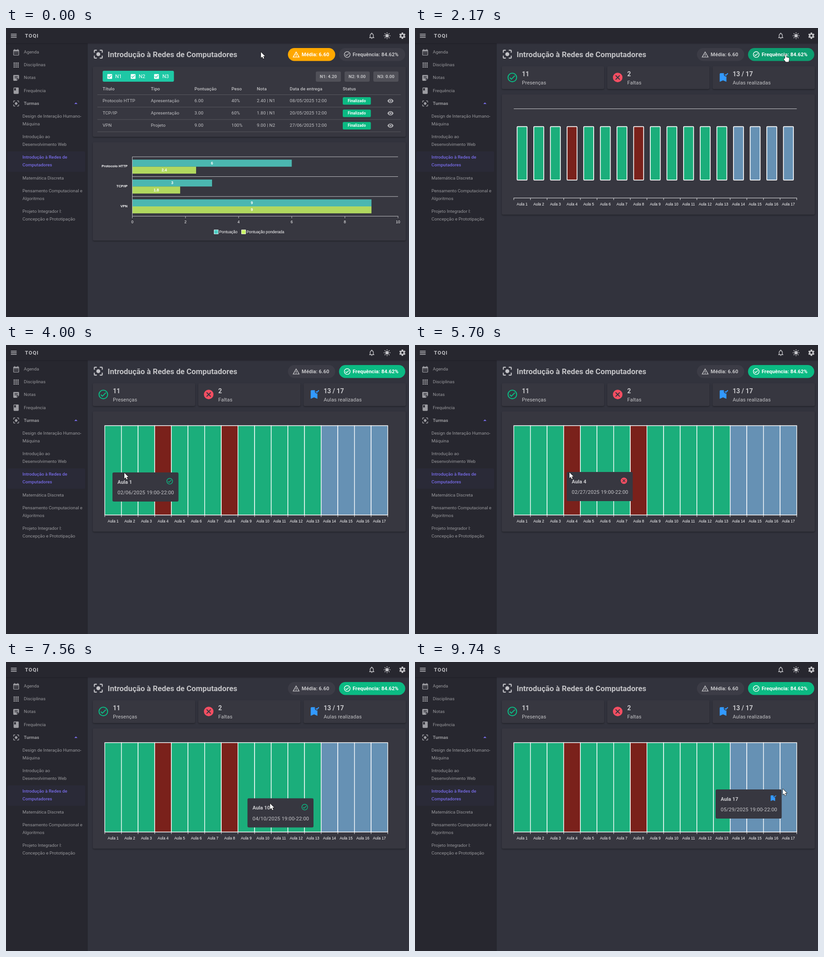
Recreate the animation shown at these times as an HTML page with a canvas. Size 882x635 px, loop 9.78 s.

```html
<!DOCTYPE html>
<html lang="pt">
<head>
<meta charset="utf-8">
<style>
  html, body { margin: 0; width: 100%; height: 100%; overflow: hidden; background: #32333d; }
  canvas { display: block; }
</style>
</head>
<body>
<canvas id="stage" width="882" height="635"></canvas>
<script>
const ctx = document.getElementById('stage').getContext('2d');
const LOOP = 9780, CLICK = 1730;
const SURFACE = '#373740', DARK = '#27272f', PRIMARY = '#776be7', SUCCESS = '#0bba83';
const WARNING = '#ffa800', ERROR = '#f64e62', INFO = '#3299ff';
const TEXT = 'rgba(255,255,255,.7)', MUTED = 'rgba(255,255,255,.52)', LINE = 'rgba(255,255,255,.16)';
const COURSE = 'Introdução à Redes de Computadores';

// Icons live on a 24 x 24 grid and are filled even-odd.
const DISC = 'M12 2a10 10 0 1 0 0 20 10 10 0 0 0 0-20z';
const squares = [4, 10, 16].flatMap(x => [4, 10, 16].map(y => `M${x} ${y}h4v4h-4z`)).join('');
const ICONS = {
  menu: 'M3 6h18v2H3zM3 11h18v2H3zM3 16h18v2H3z',
  bell: 'M10 20h4a2 2 0 0 1-4 0zM18 16v-5c0-3.1-1.6-5.6-4.5-6.3V4a1.5 1.5 0 0 0-3 0v.7C7.6 5.4 6 7.9 6 11v5l-2 2v1h16v-1zM16 17H8v-6c0-2.5 1.5-4.5 4-4.5s4 2 4 4.5z',
  calendar: 'M19 4h-1V2h-2v2H8V2H6v2H5a2 2 0 0 0-2 2v14a2 2 0 0 0 2 2h14a2 2 0 0 0 2-2V6a2 2 0 0 0-2-2zM5 9h14v11H5zM7 11h2v2H7zM11 11h2v2h-2zM15 11h2v2h-2zM7 15h2v2H7zM11 15h2v2h-2zM15 15h2v2h-2z',
  apps: squares,
  note: 'M5 3h14a2 2 0 0 1 2 2v9l-7 7H5a2 2 0 0 1-2-2V5a2 2 0 0 1 2-2zM7 7h10v2H7zM7 11h10v2H7zM14 19.5l5.5-5.5H14z',
  book: 'M18 2H6a2 2 0 0 0-2 2v16a2 2 0 0 0 2 2h12a2 2 0 0 0 2-2V4a2 2 0 0 0-2-2zM6 4h5v8l-2.5-1.5L6 12z',
  focus: 'M12 8a4 4 0 1 0 0 8 4 4 0 0 0 0-8zM5 15H3v4a2 2 0 0 0 2 2h4v-2H5zM5 5h4V3H5a2 2 0 0 0-2 2v4h2zM19 3h-4v2h4v4h2V5a2 2 0 0 0-2-2zM19 19h-4v2h4a2 2 0 0 0 2-2v-4h-2z',
  up: 'M7 14l5-5 5 5z',
  warning: 'M12 2L1 21h22zM12 6l7.5 13h-15zM11 16h2v2h-2zM11 10h2v5h-2z',
  check: DISC + 'M12 4a8 8 0 1 1 0 16 8 8 0 0 1 0-16zM16.6 7.6L10 14.2l-2.6-2.6L6 13l4 4 8-8z',
  cross: DISC + 'M17 15.6L15.6 17 12 13.4 8.4 17 7 15.6l3.6-3.6L7 8.4 8.4 7l3.6 3.6L15.6 7 17 8.4 13.4 12z',
  bookmark: 'M19 21l-7-3-7 3V5a2 2 0 0 1 2-2h7a5 5 0 0 0 5 7zM17.8 9L15 6.2l1.4-1.4 1.4 1.4 3.6-3.6L22.8 4z',
  eye: 'M12 4.5C7 4.5 2.7 7.6 1 12c1.7 4.4 6 7.5 11 7.5s9.3-3.1 11-7.5c-1.7-4.4-6-7.5-11-7.5zM12 17a5 5 0 1 1 0-10 5 5 0 0 1 0 10zM12 9a3 3 0 1 0 0 6 3 3 0 0 0 0-6z',
  box: 'M19 3H5a2 2 0 0 0-2 2v14a2 2 0 0 0 2 2h14a2 2 0 0 0 2-2V5a2 2 0 0 0-2-2zM10 17l-5-5 1.4-1.4 3.6 3.6 7.6-7.6L19 8z'
};
for (const name in ICONS) ICONS[name] = new Path2D(ICONS[name]);
const ARROW = new Path2D('M0 0v12.6l2.9-2.7 2 4.5 2.1-.9-2-4.4h4z');
const HAND = new Path2D('M-1 8V1.5a1.3 1.3 0 0 1 2.6 0V6l5 1.2a1.5 1.5 0 0 1 1.2 1.5V12l-1.2 4.5H.5L-3.8 11a1.2 1.2 0 0 1 1.7-1.6z');

// Keys: time, x, y
const CURSOR = [
  [340, 558, 53], [900, 844, 74], [1190, 811, 58], [2700, 811, 58], [3620, 234, 282], [3900, 238, 282],
  [4000, 259, 281], [4720, 312, 281], [5410, 338, 280], [5700, 338, 280], [6580, 486, 297], [7110, 486, 297],
  [7240, 470, 285], [7560, 578, 311], [8050, 692, 318], [8370, 707, 295], [8710, 707, 295], [9650, 801, 281], [9740, 805, 279]
];
const TOOLTIP = [
  [3200, 470, 190], [3660, 223, 280], [3900, 225, 280], [4000, 233, 280], [4720, 294, 281], [5410, 332, 279],
  [5700, 332, 279], [6580, 480, 297], [7110, 480, 297], [7300, 457, 285], [7560, 528.5, 299.5], [7800, 555, 316],
  [8050, 530, 316], [8370, 565, 297], [8710, 565, 297], [9650, 654, 280], [9740, 658, 280]
];

function at(keys, t) {
  if (t <= keys[0][0]) return keys[0].slice(1);
  const i = keys.findIndex(k => k[0] > t);
  if (i < 0) return keys[keys.length - 1].slice(1);
  const [t0, x0, y0] = keys[i - 1], [t1, x1, y1] = keys[i];
  const p = (t - t0) / (t1 - t0), s = p * p * (3 - 2 * p);
  return [x0 + (x1 - x0) * s, y0 + (y1 - y0) * s];
}

function text(str, x, y, size = 9.8, color = TEXT, weight = 400, align = 'left', spacing = 0, family = 'Roboto') {
  ctx.font = `${weight} ${size}px ${family}, sans-serif`;
  ctx.letterSpacing = spacing + 'px';
  ctx.textAlign = align;
  ctx.fillStyle = color;
  ctx.fillText(str, x, y);
}
const label = (str, x, y, align = 'center', weight = 400, size = 8.4) =>
  text(str, x, y + .5, size, '#fff', weight, align, 0, '"Liberation Sans"');

function rect(x, y, w, h, color, radius = 0) {
  ctx.fillStyle = color;
  ctx.beginPath();
  ctx.roundRect(x, y, w, h, radius);
  ctx.fill();
}
function card(x, y, w, h) {
  ctx.save();
  ctx.shadowColor = 'rgba(0,0,0,.35)';
  ctx.shadowBlur = 3;
  ctx.shadowOffsetY = 1.5;
  rect(x, y, w, h, SURFACE, 3);
  ctx.restore();
}
function icon(name, cx, cy, size, color) {
  ctx.save();
  ctx.translate(cx - size / 2, cy - size / 2);
  ctx.scale(size / 24, size / 24);
  ctx.fillStyle = color;
  ctx.fill(ICONS[name], 'evenodd');
  ctx.restore();
}
function spokes(cx, cy, count, from, to, width) {
  ctx.lineWidth = width;
  ctx.beginPath();
  for (let i = 0; i < count; i++) {
    const a = i * 2 * Math.PI / count - Math.PI / 2, c = Math.cos(a), s = Math.sin(a);
    ctx.moveTo(cx + from * c, cy + from * s);
    ctx.lineTo(cx + to * c, cy + to * s);
  }
  ctx.stroke();
}
function ring(cx, cy, r, width) {
  ctx.lineWidth = width;
  ctx.beginPath();
  ctx.arc(cx, cy, r, 0, 7);
  ctx.stroke();
}

function drawFrame() {
  rect(0, 0, 882, 635, '#32333d');
  rect(0, 0, 179, 635, DARK);
  ctx.save();
  ctx.shadowColor = 'rgba(0,0,0,.3)';
  ctx.shadowBlur = 3;
  rect(0, 0, 882, 33.5, DARK);
  ctx.restore();
  const bright = '#c4c4c8';
  icon('menu', 17, 17, 16.8, bright);
  text('TOQI', 41.5, 17.3, 11.2, bright, 700, 'left', 1.2);
  icon('bell', 800.5, 17, 16.8, bright);
  ctx.strokeStyle = bright;
  ring(834, 17, 1.9, 3.8);
  spokes(834, 17, 8, 5.2, 7.3, 1.7);
  ring(867.5, 17, 3.8, 2.8);
  spokes(867.5, 17, 6, 4.5, 6.9, 3.4);

  const menu = [['calendar', 'Agenda'], ['apps', 'Disciplinas'], ['note', 'Notas'], ['book', 'Frequência'], ['focus', 'Turmas']];
  menu.forEach(([name, str], i) => {
    const y = 53 + i * 28.15;
    icon(name, 22.2, y + .3, 16.8, '#9d9da2');
    text(str, 39, y + .3, 9.8, MUTED, i === 4 ? 700 : 400);
  });
  icon('up', 153, 165.5, 16.8, PRIMARY);

  rect(3, 271, 170, 45, 'rgba(119,107,231,.045)', 3);
  const classes = [
    [194, 'Design de Interação Humano-', 'Máquina'], [239.3, 'Introdução ao', 'Desenvolvimento Web'],
    [284.5, 'Introdução à Redes de', 'Computadores'], [329.7, 'Matemática Discreta'],
    [358, 'Pensamento Computacional e', 'Algoritmos'], [403.3, 'Projeto Integrador I:', 'Concepção e Prototipação']
  ];
  classes.forEach(([y, ...lines], i) => lines.forEach((str, k) =>
    text(str, 36, y + k * 17.1, 9.8, i === 2 ? PRIMARY : MUTED, i === 2 ? 500 : 400)));

  icon('focus', 202, 57.5, 26, bright);
  text(COURSE, 222.5, 58.6, 16.8, '#c3c3c6', 700);
}

function pill(x, w, name, str, color) {
  rect(x, 44, w, 28.5, color || '#3c3c46', 14.25);
  const ink = color ? '#fff' : TEXT;
  icon(name, x + 18, 58.3, 16.8, ink);
  text(str, x + 30, 59, 11.2, ink, 700, 'left', .08);
}

function drawGrades() {
  card(190, 85, 685, 154);
  rect(211.5, 94, 156, 24, '#1ec8a5', 3);
  ['N1: 4.20', 'N2: 9.00', 'N3: 0.00'].forEach((str, i) => {
    icon('box', 227 + i * 51.2, 106.5, 14, '#fff');
    text(str.slice(0, 2), 239 + i * 51.6, 107, 11.2, '#fff');
    rect(678 + i * 63, 95.5, 55, 22.5, '#505058', 3);
    text(str, 705.5 + i * 63, 107, 9.8, '#c2c2c5', 700, 'center');
  });
  const columns = [211.5, 317, 412.5, 493.5, 549, 621, 737];
  const rows = [
    ['Título', 'Tipo', 'Pontuação', 'Peso', 'Nota', 'Data de entrega', 'Status'],
    ['Protocolo HTTP', 'Apresentação', '6.00', '40%', '2.40 | N1', '08/05/2025 12:00'],
    ['TCP/IP', 'Apresentação', '3.00', '60%', '1.80 | N1', '20/05/2025 12:00'],
    ['VPN', 'Projeto', '9.00', '100%', '9.00 | N2', '27/06/2025 12:00']
  ];
  rows.forEach((row, i) => {
    const y = i ? 133 + i * 27.2 : 134;
    row.forEach((str, k) => text(str, columns[k], y, 9.8, TEXT, i ? 400 : 500, 'left', .13));
    rect(200, 146 + i * 27.2, 664, 1, LINE);
    if (!i) return;
    rect(737, y - 8.2, 61.5, 16.5, SUCCESS, 2.5);
    text('Finalizado', 767.7, y + .3, 8.4, '#fff', 700, 'center', .1);
    icon('eye', 841.5, y, 14.5, '#afafb3');
  });

  card(190, 251, 685, 216);
  const unit = 58.15, left = 276.5, axis = '#bdbdc1';
  [['Protocolo HTTP', 6, 2.4], ['TCP/IP', 3, 1.8], ['VPN', 9, 9]].forEach(([name, ...values], i) => {
    const y = 283 + i * 43.6;
    rect(left, y - .5, unit * 10, 1, axis);
    label(name, 266, y + 20.8, 'right', 700, 7.5);
    values.forEach((v, k) => {
      rect(left, y + 6.3 + k * 15.4, v * unit, 15.4, k ? '#b1d85f' : '#4bb7b0');
      label(v, left + v * unit / 2, y + 13.9 + k * 15.4, 'center', 700);
    });
  });
  rect(left - .5, 283, 1, 135, axis);
  rect(left, 413, unit * 10, 1, axis);
  for (let v = 0; v <= 10; v += 2) {
    rect(left + v * unit - .5, 413, 1, 5, axis);
    label(v, left + v * unit, 426);
  }
  [[455, 'Pontuação', '#4ecdc4'], [515, 'Pontuação ponderada', '#c7f464']].forEach(([x, str, color]) => {
    rect(x, 443, 10, 10, '#fff', 1);
    rect(x + .8, 443.8, 8.4, 8.4, color, 1);
    label(str, x + 11.5, 447.7, 'left');
  });
}

const CELL = 36.43, LEFT = 216.2, TOP = 177.3, HEIGHT = 196.2;
const kind = n => n === 4 || n === 8 ? 'cross' : n > 13 ? 'bookmark' : 'check';
const CELL_COLOR = { check: '#1bae7b', cross: '#7a211b', bookmark: '#6691b4' };
const ICON_COLOR = { check: SUCCESS, cross: ERROR, bookmark: INFO };

function drawAttendance(t) {
  [['check', '11', 'Presenças'], ['cross', '2', 'Faltas'], ['bookmark', '13 / 17', 'Aulas realizadas']].forEach(([name, count, str], i) => {
    const x = 190 + i * 230.6;
    card(x, 84, 224, 50);
    icon(name, x + 23, 108.7, 25.2, ICON_COLOR[name]);
    text(count, x + 44, 101.5, 14, '#c8c8cb', 700);
    text(str, x + 44, 120.3, 11.2, TEXT, 400, 'left', .1);
  });
  card(190, 146, 685, 264);
  rect(LEFT, 177, CELL * 17, 1, '#c8c8cb');
  rect(LEFT, 373, CELL * 17, 1, '#e4e4e6');
  for (let i = 0; i <= 17; i++) rect(LEFT + i * CELL - .5, 373, 1, 5, '#e4e4e6');

  const p = Math.min(1, (t - 1720) / 800), grow = .5 - Math.cos(Math.PI * p) / 2;
  const w = CELL * grow, h = HEIGHT * grow;
  ctx.strokeStyle = '#fff';
  ctx.lineWidth = t < 2700 ? 1.7 : 1.4;
  for (let n = 1; n <= 17; n++) {
    const cx = LEFT + (n - .5) * CELL;
    rect(cx - w / 2, TOP + (HEIGHT - h) / 2, w, h, CELL_COLOR[kind(n)], p < 1 ? 1.4 : 0);
    ctx.stroke();
    label('Aula ' + n, cx, 387);
  }
}

function drawTooltip(t) {
  const [x, y] = at(TOOLTIP, t), [seenX] = at(CURSOR, t - 60);
  const n = Math.max(1, Math.min(17, Math.floor((seenX - LEFT) / CELL) + 1));
  const [year, month, day] = new Date(Date.UTC(2025, 1, 6 + 7 * (n - 1))).toISOString().slice(0, 10).split('-');
  ctx.save();
  ctx.globalAlpha = Math.min(1, (t - 3200) / 150);
  rect(x, y, 144.5, 64, SURFACE, 3);
  text('Aula ' + n, x + 11, y + 21.2, 11.2, '#cdcdd0', 700);
  icon(kind(n), x + 125.3, y + 19.3, 16.8, ICON_COLOR[kind(n)]);
  text(`${month}/${day}/${year} 19:00-22:00`, x + 11, y + 45, 11.2, '#c6c6c9', 400, 'left', .12);
  ctx.restore();
}

function drawCursor(x, y, shape) {
  ctx.save();
  ctx.translate(x, y);
  ctx.lineJoin = 'round';
  ctx.lineWidth = 1.4;
  ctx.strokeStyle = '#111';
  ctx.stroke(shape);
  ctx.fillStyle = '#fff';
  ctx.fill(shape);
  ctx.restore();
}

function draw(now) {
  const t = now % LOOP, [x, y] = at(CURSOR, t);
  const overPill = x > 729 && x < 873 && y > 44 && y < 72;
  const clicked = t >= CLICK;
  ctx.textBaseline = 'middle';
  drawFrame();
  pill(617, 103.5, 'warning', 'Média: 6.60', clicked ? null : WARNING);
  pill(728.8, 145, 'check', 'Frequência: 84.62%', clicked ? (overPill ? '#0d9d70' : SUCCESS) : null);
  if (clicked) drawAttendance(t); else drawGrades();
  if (t > 3200) drawTooltip(t);
  drawCursor(x, y, overPill ? HAND : ARROW);
  requestAnimationFrame(draw);
}
requestAnimationFrame(draw);
</script>
</body>
</html>
```
